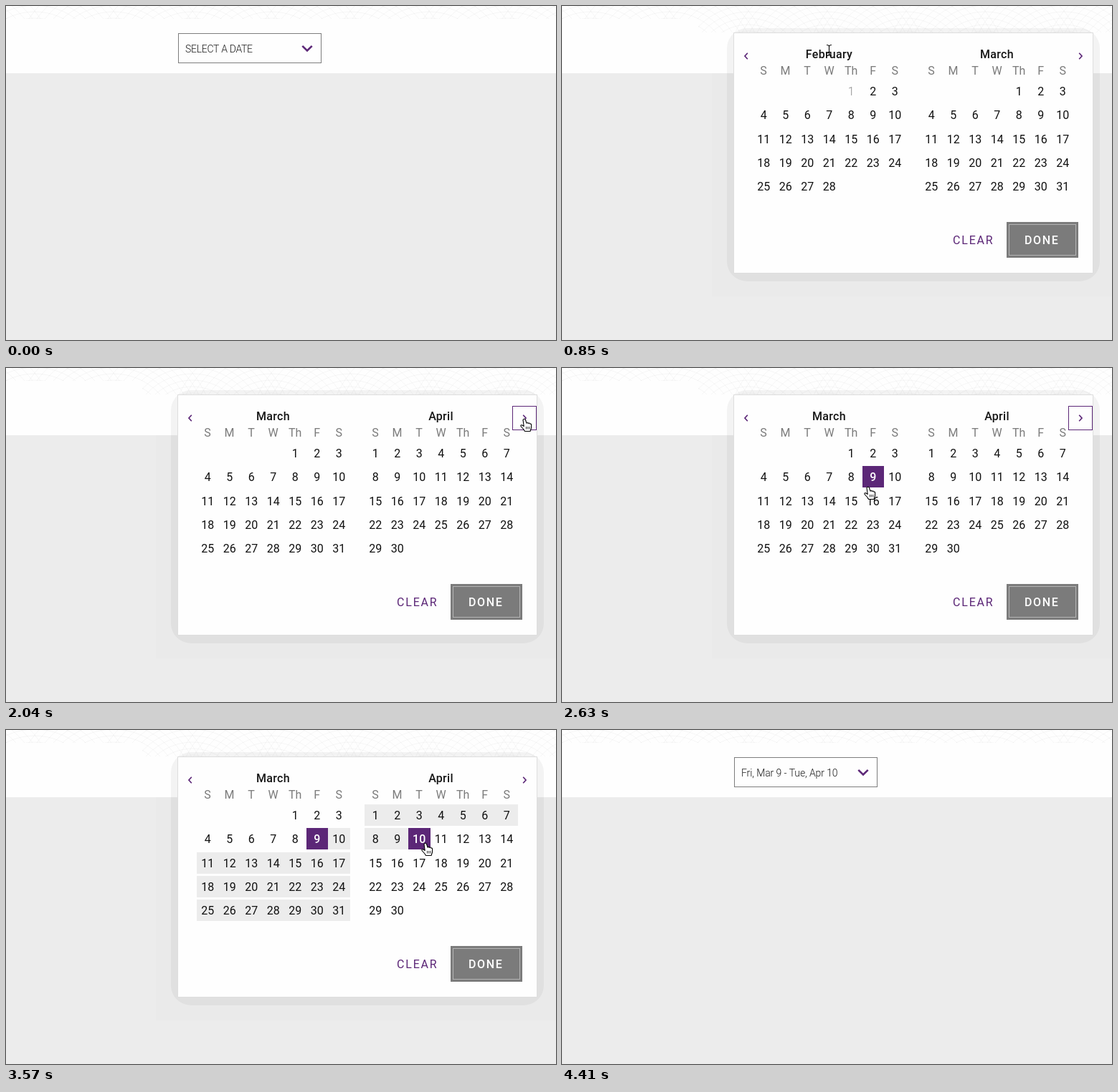
An HTML page with a canvas for the animation above (5.75 s loop, 767x467 px).

```html
<!DOCTYPE html>
<html lang="en">
<head>
<meta charset="utf-8">
<title>Date range picker</title>
<style>
html, body { margin: 0; width: 100%; height: 100%; overflow: hidden; background: #fefefe; }
canvas { display: block; }
</style>
</head>
<body>
<canvas id="stage" width="767" height="467"></canvas>
<script>
const c = document.getElementById('stage').getContext('2d');
const LOOP = 5750, STEP = 57;
const OPEN = 850, NEXT = 2040, PICK = 2625, RANGE = 3160, CLOSE = 3930, LEAVE = 4405;
const PURPLE = '#5c2777', WHITE = '#fefefe', PALE = '#ececec';

// name, weekday of the first, number of days
const FEB = ['February', 4, 28], MAR = ['March', 4, 31], APR = ['April', 0, 30];

// start time, steps, from, control point, to
const MOVES = [
  [300, 6, [817, 135], [594, 99], [372, 62]],
  [1180, 9, [372, 62], [560, 256], [713, 96]],
  [1690, 4, [713, 96], [719, 83], [723, 71]],
  [2460, 4, [723, 71], [575, 125], [427, 166]],
  [RANGE, 2, [427, 166], [478, 173], [531, 173]],
  [3280, 6, [531, 173], [578, 184], [585, 158]],
  [CLOSE, 1, [584, 158], [584, 158], [584, 158]],
  [4290, 2, [584, 158], [632, 202], [681, 247]]
];

const HAND = new Path2D('M-2 1.5Q0 -1 1.5 1.5L3 6.2Q4.5 4.7 5.5 6.5Q7 5.3 8 7.2Q9.5 6.6 9.6 8.6L9.5 13L8 17.5H.5L-1 15L-5 10.5Q-5.5 8.3 -3.5 8.8L-.8 10.5Z');
const KNUCKLES = new Path2D('M2.5 11V14.5M4.7 11V14.5M6.9 11V14.5');
const ARROW = new Path2D('M0 0V14L3.2 11L5.5 16.3L8 15.2L5.8 10.2L10 10Z');
const BEAM = new Path2D('M-3 -7.5Q0 -7.5 .5 -6Q1 -7.5 4 -7.5M.5 -6V6M-3 7.5Q0 7.5 .5 6Q1 7.5 4 7.5M-1.5 2.5H2.5');

const clamp = v => Math.max(0, Math.min(1, v));

function box(x, y, w, h, color) {
  c.fillStyle = color;
  c.fillRect(x, y, w, h);
}

function frame(x, y, w, h, color) {
  c.strokeStyle = color;
  c.lineWidth = 1;
  c.strokeRect(x + .5, y + .5, w - 1, h - 1);
}

function text(str, x, y, color, weight = 400, size = 16, spacing = 0, align = 'center') {
  c.font = `${weight} ${size}px Roboto, Arial, sans-serif`;
  c.letterSpacing = spacing + 'px';
  c.textAlign = align;
  c.fillStyle = color;
  c.fillText(str, x, y);
}

function chevron(x, y, dx, dy, width) {
  c.beginPath();
  if (dy > Math.abs(dx)) c.moveTo(x - dx, y - dy), c.lineTo(x, y), c.lineTo(x - dx, y + dy);
  else c.moveTo(x - dx, y - dy), c.lineTo(x, y), c.lineTo(x + dx, y - dy);
  c.strokeStyle = PURPLE;
  c.lineWidth = width;
  c.stroke();
}

function pointerAt(t) {
  const move = MOVES.filter(m => m[0] <= t).pop();
  if (!move || t >= LEAVE) return null;
  const [start, steps, a, b, d] = move;
  const k = Math.min(steps, Math.floor((t - start + 8) / STEP) + 1);
  const u = Math.sin(k / steps * Math.PI / 2), v = 1 - u;
  return [0, 1].map(i => v * v * a[i] + 2 * u * v * b[i] + u * u * d[i]);
}

function background(open) {
  box(0, 0, 767, 467, WHITE);
  c.save();
  c.beginPath();
  c.rect(0, 0, 767, 18);
  if (open) c.rect(190, 18, 577, 19);
  c.clip();
  c.strokeStyle = 'rgba(0,0,0,.05)';
  c.lineWidth = .7;
  for (let x = -70; x < 860; x += 110)
    for (let r = 60; r < 150; r += 9) {
      c.beginPath();
      c.arc(x, 95, r, Math.PI, 2 * Math.PI);
      c.stroke();
    }
  c.restore();
  box(0, 94, 767, 373, PALE);
}

function select(label, spacing) {
  box(240, 38, 200, 42, WHITE);
  frame(240, 38, 200, 42, '#7d7d7d');
  text(label, 250, 65, '#1c1c1c', 300, 14, spacing, 'left');
  chevron(420, 62.5, 6.7, 6.7, 2.6);
}

function month([name, first, days], left, offset, lastDay, pastDay) {
  const mid = left + 106.5;
  text(name, mid, 73, '#161616', 500, 16, .3);
  ['S', 'M', 'T', 'W', 'Th', 'F', 'S'].forEach((d, i) =>
    text(d, left + 15 + i * 30.55, 96, '#7b7b7b'));
  for (let day = 1; day <= days; day++) {
    const n = first + day - 1, id = day + offset;
    const x = left + n % 7 * 30.5, y = Math.round(104 + Math.floor(n / 7) * 33.3);
    const marked = id === 9 && lastDay >= 9 || id === lastDay && id > 31;
    if (marked || id > 9 && id <= lastDay) {
      const x0 = Math.round(x), x1 = Math.round(x + 30.5);
      box(x0, y, x1 - x0, 30, marked ? PURPLE : PALE);
    }
    const past = day === pastDay;
    text(day, x + 15.2, y + 21, marked ? '#fff' : past ? '#8c8c8c' : '#111',
      marked ? 500 : past ? 300 : 400);
  }
}

function popup(t, p) {
  box(209, 94, 558, 312, 'rgba(0,0,0,.007)');
  c.fillStyle = 'rgba(0,0,0,.042)';
  c.beginPath();
  c.roundRect(230, 31, 520, 354, 28);
  c.fill();
  box(239, 37, 502, 337, WHITE);
  frame(239, 37, 502, 337, '#dedede');

  c.globalAlpha = t < 2900 ? clamp((t - 1690) / 170) : clamp((2990 - t) / 120);
  frame(706, 53, 34, 34, PURPLE);
  c.globalAlpha = 1;
  chevron(255, 70, -3.8, 4.2, 1.7);
  chevron(725, 70, 3.8, 4.2, 1.7);

  if (t < NEXT) {
    month(FEB, 266, 0, -1, 1);
    month(MAR, 500, 0, -1);
  } else {
    let last = t < PICK ? -1 : t < RANGE ? 9 : 10;
    if (t >= 3280)
      last = 32 + Math.floor((p[0] - 500) / 30.5) + 7 * Math.floor((p[1] - 104) / 33.3);
    month(MAR, 266, 0, last);
    month(APR, 500, 31, last);
  }

  text('CLEAR', 545, 333, PURPLE, 400, 16, 1.8, 'left');
  box(620, 302, 100, 50, '#7b7b7b');
  frame(623, 305, 94, 44, '#b4b4b4');
  text('DONE', 645, 333, '#fff', 500, 16, 1.6, 'left');
}

function pointer(t, [x, y]) {
  const inSelect = t < 1180 && x > 240 && x < 440 && y > 38 && y < 80;
  const onDate = t >= 1180 && t < 1630 && y > 104 && y < 267 && (x > 266 && x < 479 || x > 500 && x < 713);
  c.save();
  c.translate(x, y);
  c.lineJoin = 'round';
  c.lineWidth = 1.1;
  c.strokeStyle = '#000';
  if (inSelect) {
    c.stroke(BEAM);
  } else if (onDate || t >= 1690 && t < CLOSE) {
    c.fillStyle = '#fff';
    c.fill(HAND);
    c.stroke(HAND);
    c.lineWidth = .8;
    c.stroke(KNUCKLES);
  } else {
    c.shadowColor = 'rgba(0,0,0,.3)';
    c.shadowBlur = 2;
    c.shadowOffsetY = 1;
    c.strokeStyle = '#fff';
    c.lineWidth = 2;
    c.stroke(ARROW);
    c.shadowColor = 'transparent';
    c.fillStyle = '#000';
    c.fill(ARROW);
  }
  c.restore();
}

function draw(now) {
  const t = now % LOOP, p = pointerAt(t);
  const open = t >= OPEN && t < CLOSE;
  background(open);
  if (open) popup(t, p);
  else if (t < OPEN) select('SELECT A DATE', -.3);
  else select('Fri, Mar 9 - Tue, Apr 10', -.1);
  if (p) pointer(t, p);
}

const begin = performance.now();
function tick() {
  draw(performance.now() - begin);
  requestAnimationFrame(tick);
}
tick();
</script>
</body>
</html>
```
